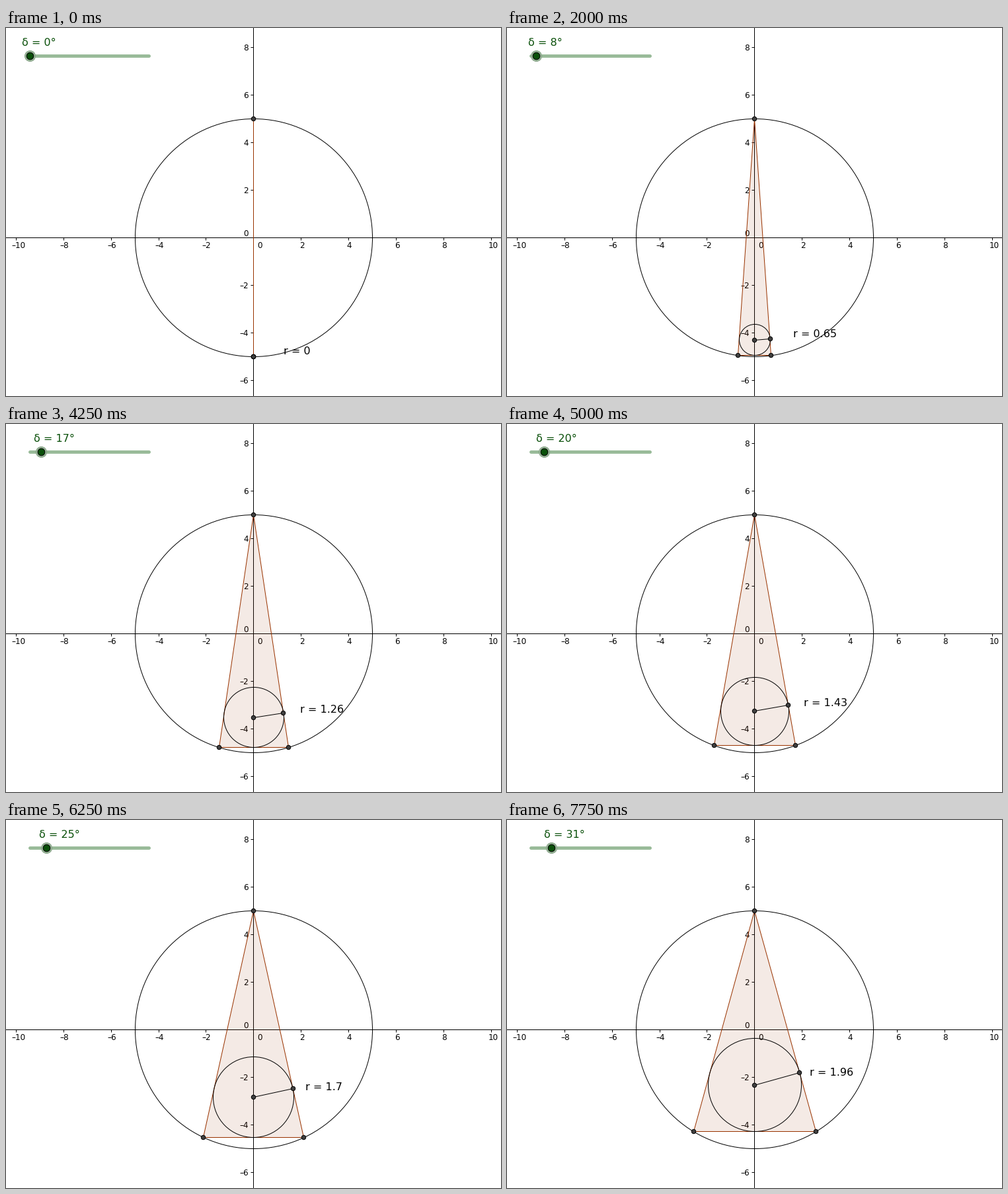
These frames come from a looping animation (749x557 px, 8000 ms). A matplotlib script:

```python
import math

import matplotlib.pyplot as plt
from matplotlib.animation import FuncAnimation
from matplotlib.patches import Circle, Ellipse, Polygon

W, H, DPI = 749, 557, 64
PT = 72 / DPI                # points per pixel
UNIT = 35.95                 # pixels per coordinate unit
OX, OY = 374.8, 317.5        # origin of the coordinate system
RADIUS = 5
STEPS = 32                   # one degree per step
GREEN, BROWN = "#0a500a", "#993300"

plt.rcParams["font.family"] = "DejaVu Sans"
fig = plt.figure(figsize=(W / DPI, H / DPI), dpi=DPI, facecolor="white")
ax = fig.add_axes([0, 0, 1, 1])
ax.set_xlim(0, W)
ax.set_ylim(H, 0)
ax.axis("off")


def to_px(x, y):
    """Centre of the pixel that holds the point (x, y)."""
    return math.floor(OX + x * UNIT) + 0.5, math.floor(OY - y * UNIT) + 0.5


def line(xs, ys, color="black", width=1, z=1, **style):
    return ax.plot(xs, ys, color=color, lw=width * PT, zorder=z,
                   snap=False, **style)[0]


def label(x, y, s, size=12, color="black", ha="left", z=1):
    return ax.text(x, y, s, fontsize=size * PT, color=color, ha=ha,
                   va="baseline", zorder=z)


def disc(r, fill, edge="black", z=5):
    return ax.add_patch(Circle((0, 42.5), r, fc=fill, ec=edge,
                               lw=PT, zorder=z))


def ring():
    return ax.add_patch(Ellipse((0, 0), 1, 1, fc="none", ec="black",
                                lw=PT, zorder=4))


def place_ring(patch, cy, r):
    x0, y0 = to_px(-r, cy + r)
    x1, y1 = to_px(r, cy - r)
    patch.set_center(((x0 + x1) / 2, (y0 + y1) / 2))
    patch.set_width(x1 - x0)
    patch.set_height(y1 - y0)


def number(n):
    return str(n).replace("-", "–")


def draw_axes():
    x0, y0 = to_px(0, 0)
    line([0, W], [y0, y0])
    line([x0, x0], [0, H])
    for n in range(-10, 11, 2):
        if n == 0:
            continue
        x, y = to_px(n, n)
        line([x, x], [y0, y0 + 3.5])
        shift = 3 if abs(n) == 10 else 1
        label(x + shift, 333, number(n), ha="center")
        if -6 <= n <= 8:
            line([x0 - 3.5, x0], [y, y])
            label(367, y + 5, number(n), ha="right")
    label(380, 333, "0")
    label(367, 315, "0", ha="right")


draw_axes()
place_ring(ring(), 0, RADIUS)

fill = ax.add_patch(Polygon([(0, 0)] * 3, fc=BROWN, alpha=0.1, lw=0, zorder=2))
base = line([], [], BROWN, z=3)
sides = line([], [], BROWN, z=3, solid_joinstyle="bevel")
incircle = ring()
spoke = line([], [], z=4)
dots = [disc(3.2, "#404040") for _ in range(5)]
radius_text = label(0, 0, "", 16, z=6)

line([36.5, 216.5], [42.5, 42.5], "#99bb99", 5, solid_capstyle="round")
halo = disc(8, "#9ab99a", "#86a086")
knob = disc(5.3, GREEN, z=6)
angle_text = label(0, 27, "", 16, GREEN, z=6)


def update(k):
    d = math.radians(k)
    half = RADIUS * math.sin(d)
    bottom = -RADIUS * math.cos(d)
    height = RADIUS - bottom
    r = half * height / (half + math.hypot(half, height))
    cy = bottom + r
    dx, dy = r * math.cos(d / 2), r * math.sin(d / 2)

    apex = to_px(0, RADIUS)
    left, right = to_px(-half, bottom), to_px(half, bottom)
    center, touch = to_px(0, cy), to_px(dx, cy + dy)

    fill.set_xy([left, apex, right])
    sides.set_data(*zip(left, apex, right))
    base.set_data(*zip(left, right))
    place_ring(incircle, cy, r)
    spoke.set_data(*zip(center, touch))
    for dot, p in zip(dots, (apex, left, right, center, touch)):
        dot.set_center(p)

    # the label sits beside the spoke's midpoint, pushed along its normal
    mx, my = to_px(dx / 2, cy + dy / 2)
    radius_text.set_position((mx + 45.5 + 16 * math.sin(d / 2),
                              my - 19.5 + 16 * math.cos(d / 2)))
    radius_text.set_text(f"r = {round(r, 2):g}")

    x = 36.5 + k
    halo.set_center((x, 42.5))
    knob.set_center((x, 42.5))
    angle_text.set_x(x - 12)
    angle_text.set_text(f"δ = {k}°")
    return []


anim = FuncAnimation(fig, update, frames=STEPS, interval=250, repeat=True)
plt.show()
```
